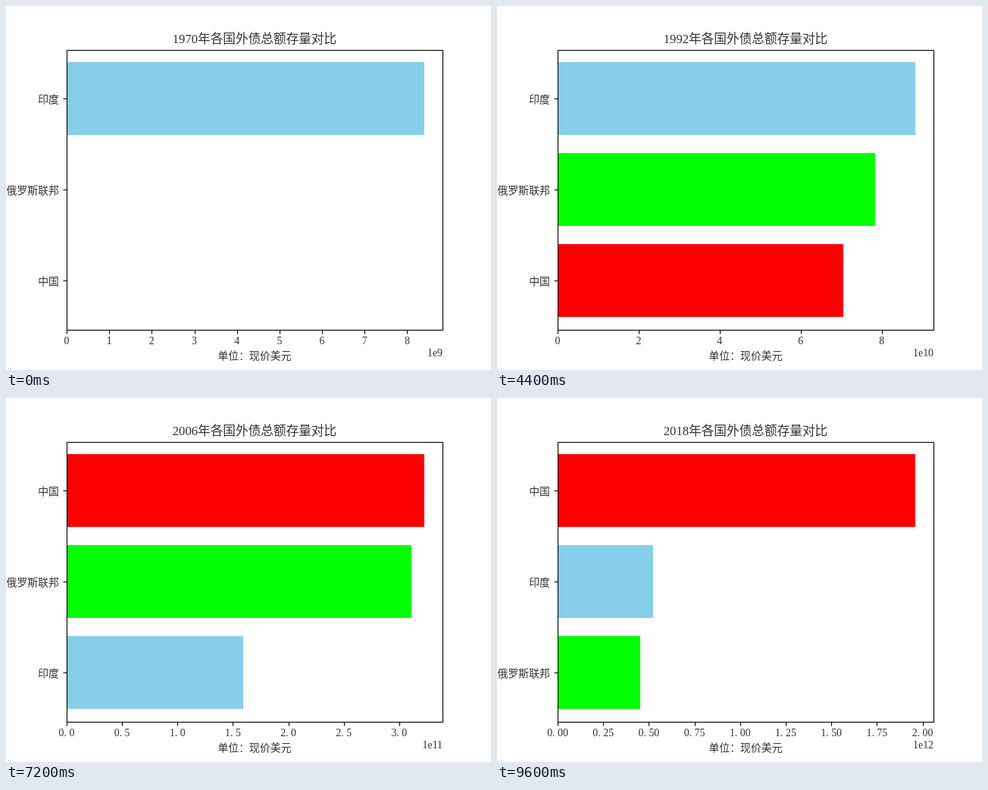
These frames come from a looping animation (640 by 480 pixels, 9.8 s). An HTML page with a canvas:

```html
<!DOCTYPE html>
<html lang="zh-CN">
<head>
<meta charset="utf-8">
<style>
  html, body { margin: 0; width: 100%; height: 100%; overflow: hidden; background: #fff; }
  canvas { display: block; }
</style>
</head>
<body>
<canvas id="chart" width="640" height="480"></canvas>
<script>
const ctx = document.getElementById('chart').getContext('2d');
const FIRST_YEAR = 1970, YEAR_COUNT = 49, YEAR_MS = 200;
const LEFT = 80, TOP = 58, WIDTH = 496, BOTTOM = 427;
const ROW_HEIGHT = 120, BAR_HEIGHT = 96, FIRST_BAR = 74;

// Turning points as year: billions of dollars, with steady growth between them.
const countries = [
  { name: '印度', color: '#87ceeb', debt: {
    1970: 8.41, 1979: 18.16, 1987: 53.4, 1989: 73.4, 1994: 100, 1996: 93.9,
    2001: 100.6, 2006: 159.4, 2013: 427.2, 2015: 478.8, 2018: 522 } },
  { name: '俄罗斯联邦', color: '#0f0', debt: {
    1977: 0.7, 1979: 1.885, 1985: 28.3, 1987: 38.35, 1992: 78.4, 1993: 111.9,
    1996: 126.9, 1998: 177.8, 2001: 133, 2006: 311.3, 2007: 408, 2010: 418,
    2013: 669, 2015: 467.7, 2016: 533, 2018: 453.5 } },
  { name: '中国', color: '#f00', debt: {
    1978: 0.62, 1979: 2.19, 1981: 5.8, 1984: 12.08, 1987: 35.3, 1989: 44.9,
    1996: 128.8, 2000: 145.7, 2001: 184.8, 2003: 208.4, 2006: 322.9, 2009: 444.9,
    2010: 742.7, 2013: 1470, 2014: 1770, 2015: 1325, 2018: 1962 } }
];

function debtIn(year, debt) {
  const years = Object.keys(debt).map(Number);
  const next = years.find(y => y >= year);
  if (next === year) return debt[year];
  const last = years[years.indexOf(next) - 1];
  if (!last) return 0;
  return debt[last] * (debt[next] / debt[last]) ** ((year - last) / (next - last));
}

function text(string, x, y, align = 'center', size = 13.89) {
  ctx.font = `300 ${size}px "Liberation Serif", "Noto Sans CJK SC", "Noto Sans CJK", serif`;
  ctx.textAlign = align;
  ctx.fillStyle = '#333';
  ctx.fillText(string, x, y);
}

function line(x, y, dx, dy) {
  ctx.beginPath();
  ctx.moveTo(x + 0.5, y + 0.5);
  ctx.lineTo(x + dx + 0.5, y + dy + 0.5);
  ctx.stroke();
}

// Smallest round step that gives at most nine intervals.
function tickStep(limit) {
  const raw = limit / 9, scale = 10 ** Math.floor(Math.log10(raw));
  return scale * [1, 2, 2.5, 5, 10].find(s => s * scale >= raw);
}

function drawAxis(limit) {
  const step = tickStep(limit), count = Math.floor(limit / step);
  const exponent = Math.floor(Math.log10(count * step) + 1e-9);
  const ratio = step / 10 ** exponent;
  const decimals = [0, 1, 2].find(d => Math.abs(+ratio.toFixed(d) - ratio) < 1e-9);
  for (let i = 0; i <= count; i++) {
    const x = LEFT + WIDTH * i * step / limit;
    line(Math.round(x), BOTTOM, 0, 5);
    // The padded point is as wide as a digit.
    text((i * ratio).toFixed(decimals).replace('.', '. '), x, 446);
  }
  text('1e' + (exponent + 9), 576, 462, 'right');
}

function draw(year) {
  const rows = countries
    .map(c => ({ ...c, value: debtIn(year, c.debt) }))
    .sort((a, b) => b.value - a.value);
  const limit = rows[0].value * 1.05;

  ctx.fillStyle = '#fff';
  ctx.fillRect(0, 0, 640, 480);
  ctx.lineWidth = 1.11;
  rows.forEach((row, i) => {
    const y = FIRST_BAR + i * ROW_HEIGHT, middle = y + BAR_HEIGHT / 2;
    ctx.fillStyle = row.color;
    ctx.fillRect(LEFT, y, Math.round(WIDTH * row.value / limit), BAR_HEIGHT);
    line(LEFT, middle, -5, 0);
    text(row.name, 70, middle + 6, 'right');
  });
  drawAxis(limit);
  ctx.strokeRect(LEFT + 0.5, TOP + 0.5, WIDTH, BOTTOM - TOP);
  text(year + '年各国外债总额存量对比', 328, 49, 'center', 16.67);
  text('单位：现价美元', 328, 466);
}

function tick() {
  draw(FIRST_YEAR + Math.floor(performance.now() / YEAR_MS) % YEAR_COUNT);
  requestAnimationFrame(tick);
}
tick();
</script>
</body>
</html>
```
